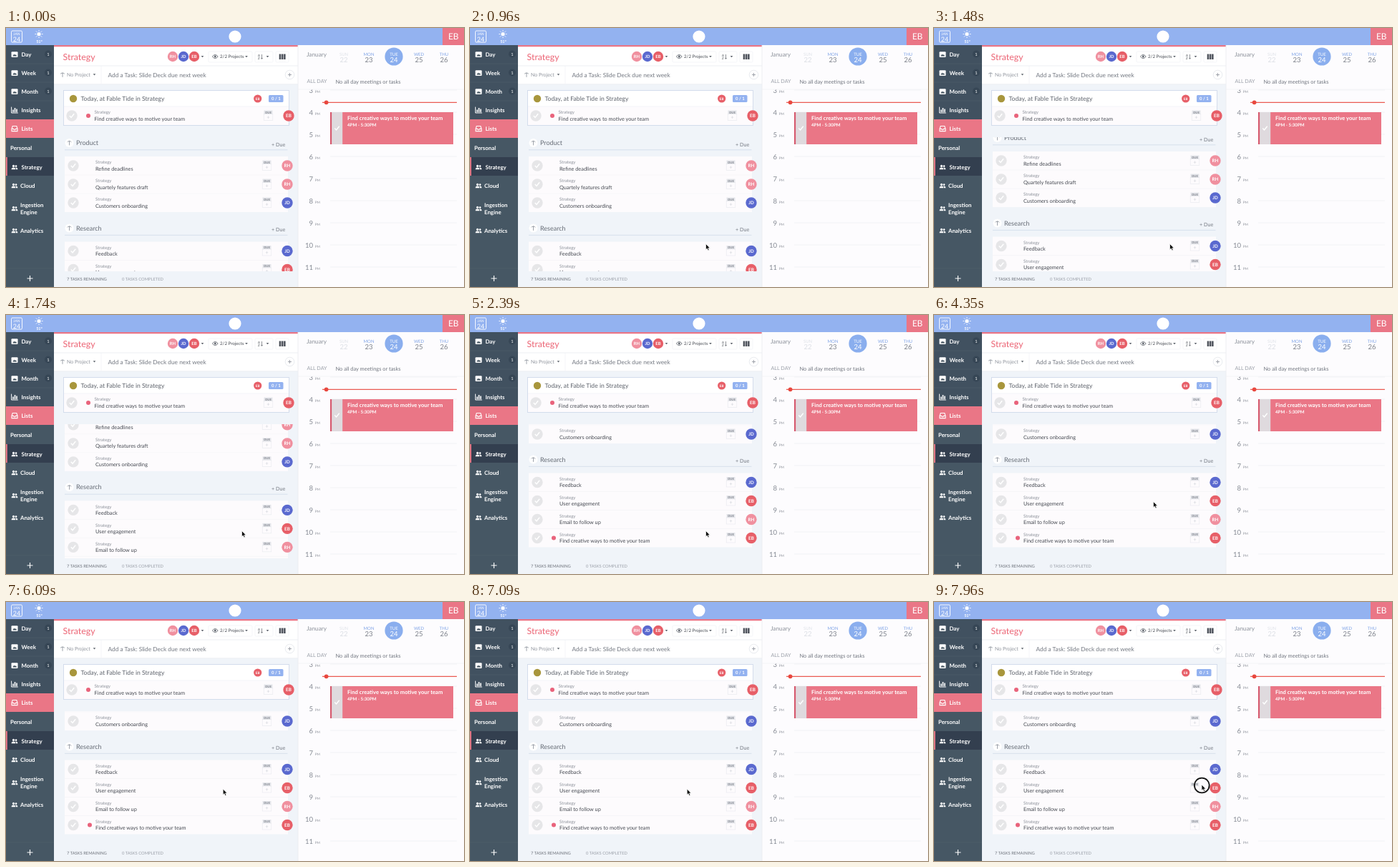
An HTML page that plays this animation: 640 px wide and 363 px high, repeating every 8000 ms.

```html
<!DOCTYPE html>
<html lang="en">
<head>
<meta charset="utf-8">
<title>Task planner</title>
<style>
  html, body { margin: 0; width: 100%; height: 100%; overflow: hidden; background: #fdfcfe; }
  svg { display: block; width: 100%; height: 100%; font-family: Lato, "Open Sans", sans-serif; text-rendering: geometricPrecision; }
</style>
</head>
<body>
<svg id="stage" viewBox="0 0 640 363"></svg>
<script>
const DURATION = 8000;
const PINK = '#ea7686', BLUE = '#93b2f0', INK = '#454951', GREY = '#8d929b', PALE = '#e6e8ed';
const PEOPLE = { RH: '#f0909f', JD: '#5a69cf', EB: '#e75f68' };

// Drawing helpers: each returns SVG markup.
const rect = (x, y, w, h, fill, extra = '') =>
  `<rect x="${x}" y="${y}" width="${w}" height="${h}" fill="${fill}" ${extra}/>`;
const circle = (x, y, r, fill, extra = '') =>
  `<circle cx="${x}" cy="${y}" r="${r}" fill="${fill}" ${extra}/>`;
const stroke = (d, color, width = 1, extra = '') =>
  `<path d="${d}" fill="none" stroke="${color}" stroke-width="${width}" ${extra}/>`;
const fill = (d, color) => `<path d="${d}" fill="${color}"/>`;
const text = (x, y, str, size, color = INK, extra = '') =>
  `<text x="${x}" y="${y}" font-size="${size}" fill="${color}" ${extra}>${str}</text>`;
const MID = 'text-anchor="middle"', BOLD = 'font-weight="700"';
const group = (x, y, body, scale = 1) => `<g transform="translate(${x} ${y}) scale(${scale})">${body}</g>`;

const caret = (x, y) => fill(`M${x - 1.8} ${y - 1}h3.6l-1.8 2.2z`, '#5d626b');
const plus = (x, y, r, color, width = 1) => stroke(`M${x - r} ${y}h${2 * r}M${x} ${y - r}v${2 * r}`, color, width);
const tick = (x, y, s, color, width) =>
  stroke(`M${x - s} ${y}l${s * .7} ${s * .75}l${s * 1.3} ${-s * 1.6}`, color, width);
const avatar = (x, y, who, r = 7.7) =>
  circle(x, y, r, PEOPLE[who]) + text(x, y + r * .3, who, r * .82, '#fff', MID + BOLD);
const signpost = (x, y) =>
  group(x, y, stroke('M0 -4V4.2M-3.6 -1.4Q-3 -3 0 -2.8Q3 -3 3.6 -1.4', '#9a9fa8', 1.2), .8);

function topBar() {
  const rays = Array.from({ length: 8 }, (_, i) =>
    stroke('M0 -3.8V-5.6', '#fff', .9, `transform="translate(46 8.5) rotate(${i * 45})"`)).join('');
  return rect(0, 0, 640, 24, BLUE) +
    rect(7.5, 4, 15, 16, 'none', 'rx="1.5" stroke="#fff" stroke-width=".9"') +
    text(15, 9.6, 'JAN', 5, '#fff', MID) + text(15, 18.5, '24', 9, '#fff', MID) +
    circle(46, 8.5, 2.6, '#fff') + rays + text(46.5, 20.5, '51°', 5.5, '#fff', MID + BOLD) +
    circle(320, 12, 8.6, '#fff') +
    rect(610, 0, 30, 24, PINK) + text(625.3, 16.3, 'EB', 12, '#fff', MID);
}

function sideIcon(kind, y) {
  const icons = {
    calendar: rect(-4.5, -3.8, 9, 7.8, '#fff', 'rx="1"') + fill('M-2.8 2.4L-.6 -.6L.8 1L1.8 0L3 2.4Z', '#43535f'),
    bars: stroke('M-4.4 -4.4V4H4.8', '#fff', 1) +
      [0, 1, 2].map(i => rect(-2.8 + i * 2.5, [-.5, -3, -1.5][i], 1.6, [3.4, 5.9, 4.4][i], '#fff')).join(''),
    tray: stroke('M-4 .4L-2.8 -3.5H2.8L4 .4V3.6H-4ZM-4 .4H-1.6Q0 3 1.6 .4H4', '#fff', 1.1),
    people: circle(-1.7, -1.8, 1.8, '#fff') + circle(2.3, -1.6, 1.5, '#fff') +
      fill('M-5 3.6Q-5 .7 -1.7 .7Q1.4 .7 1.4 3.6ZM2.2 3.6Q2.2 1.6 1.3 .8Q5 .2 5 3.6Z', '#fff')
  };
  return group(12, y, icons[kind], kind === 'people' ? .88 : 1);
}

function sidebar() {
  const items = [
    ['Day', 37, 'calendar', 1], ['Week', 63, 'calendar', 1], ['Month', 89, 'calendar', 1],
    ['Insights', 115, 'bars'], ['Lists', 141, 'tray'],
    ['Strategy', 195, 'people'], ['Cloud', 221, 'people'], ['Analytics', 284, 'people']
  ];
  const label = (x, y, str) => text(x, y + 2.6, str, 7.85, '#fff', BOLD);
  let out = rect(0, 24, 67, 339, '#465764') + rect(0, 24, 67, 104, '#415160') +
    rect(0, 128, 67, 26, PINK) + rect(0, 181, 67, 26, '#333f4f') + rect(0, 181, 1.8, 26, PINK) +
    stroke('M0 50H67M0 76H67M0 102H67M0 337H67', '#52636f', .5);
  for (const [name, y, icon, badge] of items) {
    out += sideIcon(icon, y) + label(name === 'Cloud' || name === 'Analytics' ? 20 : 21.5, y, name);
    if (badge) out += circle(59, y - .5, 5, '#364655') + text(59, y + 1.6, badge, 5.8, '#fff', MID);
  }
  return out + label(6, 168, 'Personal') + sideIcon('people', 253) +
    label(20, 248, 'Ingestion') + label(20, 258, 'Engine') + plus(33.5, 351, 4, '#fff', 1.1);
}

function header() {
  const box = (x, w) => rect(x, 33, w, 15, '#fff', 'rx="1.5" stroke="#f0f1f5" stroke-width=".7"');
  return rect(67, 24, 341, 55, '#fff') + rect(67, 24, 341, 2.2, PINK) +
    text(79.5, 44.6, 'Strategy', 12.4, '#ec6676') +
    avatar(233, 40, 'RH', 7.2) + avatar(248, 40, 'JD', 7.2) + avatar(263, 40, 'EB', 7.2) + caret(274.5, 40) +
    box(283, 61) + stroke('M288.4 40Q292.3 35 296.2 40Q292.3 45 288.4 40Z', '#5d626b', .9) +
    circle(292.3, 40, 1.4, '#5d626b') + text(299, 42.3, '2/2 Projects', 6.2, INK) + caret(336, 40) +
    box(348, 25) + text(352, 39.6, 'A', 4.4, INK) + text(352, 44.4, 'Z', 4.4, INK) +
    stroke('M357.5 37V43.3M356.3 42L357.5 43.4L358.7 42', '#5d626b', .7) + caret(365.5, 40) +
    box(377, 18) + [0, 1, 2].map(i => rect(381.7 + i * 3.2, 36.5, 2.5, 7.5, '#4d525b')).join('') +
    stroke('M67 53H408M67 78.8H408', '#e9ebf0', .8) + stroke('M133 53V78', '#f0f1f5', .7) +
    signpost(79, 65.5) + text(85, 68, 'No Project', 7, GREY) + caret(123.5, 65.3) +
    text(142.5, 68.6, 'Add a Task: Slide Deck due next week', 8.33, '#747982') +
    circle(396.5, 65.5, 6.3, '#fff', `stroke="${PALE}" stroke-width=".9"`) + plus(396.5, 65.5, 2.5, GREY, .8);
}

// A task row centred on y; the pinned card uses its own columns.
function task(y, title, who, { dot = false, pinned = false } = {}) {
  const dueX = pinned ? 366.5 : 364.5, textX = pinned ? 123.5 : 125, checkX = pinned ? 92 : 94;
  return circle(checkX, y, 7.7, '#e6e6e8') + tick(checkX, y, 3.2, '#fff', 1.5) +
    (dot ? circle(pinned ? 115 : 117, y, 3, '#e9637c') : '') +
    text(textX, y - 2.6, 'Strategy', 6.2, GREY) + text(textX, y + 6.6, title, 7.35, INK) +
    rect(dueX - 6.3, y - 2.5, 12.6, 9, 'none', `stroke="${PALE}" stroke-width=".6"`) +
    rect(dueX - 6, y - 7.5, 12, 5.2, '#e4e5ea') + text(dueX, y - 3.4, 'DUE', 4.2, '#7d828b', MID + BOLD) +
    plus(dueX, y + 2.2, 1.8, '#d3d6dc', .6) + avatar(pinned ? 395 : 393, y, who);
}

function todayCard() {
  return rect(80.5, 87.5, 315, 49, '#fff', 'stroke="#d0daea" stroke-width=".9"') +
    rect(81, 110, 314, 26, '#fdfbfd') + stroke('M81 110H395', '#eff1f6', .7) +
    circle(94, 99, 5.2, '#a8963c') + text(104.5, 102, 'Today, at Fable Tide in Strategy', 8.65, '#5d626b') +
    avatar(351.7, 99, 'EB', 5.6) + rect(367, 94, 20.5, 10, BLUE, 'rx="1.5"') +
    text(377.3, 101.2, '0 / 1', 6, '#fff', MID + BOLD) +
    task(123, 'Find creative ways to motive your team', 'EB', { dot: true, pinned: true });
}

function section(y, name, tasks) {
  const top = y + 19;
  return circle(88.5, y, 6, '#fff') + signpost(88.5, y) + text(98, y + 3, name, 9, '#646a74') +
    text(371, y + 4.9, '+ Due', 7.2, '#747982') + stroke(`M82 ${y + 9.8}H393.5`, '#d3deeb', .9) +
    rect(82, top, 312, tasks.length * 26, '#fdfbfd') +
    tasks.map(([title, who, dot], i) =>
      (i ? stroke(`M82 ${top + i * 26}H394`, '#f4f4f7', .7) : '') + task(top + 13 + i * 26, title, who, { dot })).join('');
}

function taskList() {
  const product = section(161, 'Product', [
    ['Refine deadlines', 'RH'], ['Quartely features draft', 'RH'], ['Customers onboarding', 'JD']]);
  const research = section(280.5, 'Research', [
    ['Feedback', 'JD'], ['User engagement', 'EB'], ['Email to follow up', 'RH'],
    ['Find creative ways to motive your team', 'EB', true]]);
  return `<clipPath id="listArea">${rect(67, 153, 341, 188, '#000')}</clipPath>
    <g clip-path="url(#listArea)"><g id="list">${product + research}</g></g>`;
}

function footer() {
  return rect(67, 341, 341, 22, '#f0f4f9') +
    text(85, 354, '7 TASKS REMAINING', 5.8, '#6d727b') + text(162, 354, '0 TASKS COMPLETED', 5.8, '#9a9fa8');
}

function calendar() {
  const days = ['SUN', 'MON', 'TUE', 'WED', 'THU'];
  let out = rect(408, 24, 232, 339, '#fdfcfe') + circle(542, 40, 12.6, '#8aaeee');
  days.forEach((day, i) => {
    const x = 472 + i * 35, today = i === 2;
    out += text(x, 39, day, 6, today ? '#fff' : i ? '#7fa3e6' : '#dfe2e8', MID) +
      text(x, 47.7, 22 + i, 9.6, today ? '#fff' : i ? '#7c818a' : '#dcdfe5', MID);
  });
  let hours = '';
  for (let h = 3; h <= 11; h++) {
    const y = 118 + (h - 4) * 31;
    hours += text(429.2, y + 3.5, h, 9.6, '#858a93', 'text-anchor="end"') + text(431.8, y + 3.5, 'PM', 4.7, GREY) +
      stroke(`M453 ${y}H630`, '#eeeef2', .8);
  }
  return out + text(420, 40, 'January', 8.3, GREY) +
    text(420.5, 77.3, 'ALL DAY', 7.2, '#9a9fa8') + text(460.5, 77.7, 'No all day meetings or tasks', 7.45, '#70757e') +
    `<clipPath id="hourArea">${rect(408, 86, 232, 277, '#000')}</clipPath>
     <g clip-path="url(#hourArea)">${hours}</g>` +
    stroke('M408 86H640', '#f0f0f4', .8) +
    stroke('M442 104.3H630', '#ea5a51', 1.2) + circle(447.6, 104.3, 2.9, '#e8483f') +
    rect(453, 118, 172, 45, PINK) + rect(453, 118, 2.2, 45, '#d65a6e') + rect(455.2, 118, 15, 45, '#dfdade') +
    tick(462.5, 140.5, 3.2, '#fff', 1.4) +
    text(477, 129, 'Find creative ways to motive your team', 7.65, '#fff', BOLD) +
    text(477, 138.3, '4PM - 5:30PM', 6.2, '#fff', BOLD) +
    stroke('M408 24V363', '#eaebf0', .8);
}

const cursor = `<g id="cursor">
  <circle id="ring" cx=".3" cy="1" r="10.4" fill="none" stroke="#111" stroke-width="1.8"/>
  <path d="M0 0V8.2L1.9 6.5L3.2 9.4L4.7 8.7L3.4 5.9H5.9Z" fill="#111" stroke="#fff" stroke-width=".7"/></g>`;

const stage = document.getElementById('stage');
stage.innerHTML = rect(67, 78, 341, 285, '#f0f4f9') + taskList() + header() + todayCard() +
  footer() + calendar() + sidebar() + topBar() + cursor;

const find = id => document.getElementById(id);
const list = find('list'), pointer = find('cursor'), ring = find('ring');

const smooth = (t, from, to) => {
  const p = Math.min(1, Math.max(0, (t - from) / (to - from)));
  return p * p * (3 - 2 * p);
};

// Pointer stops: [time, x, y]
const STOPS = [
  [350, 336, 366], [800, 329.5, 302.5], [3400, 329.5, 302.5], [4100, 306.5, 261.5],
  [4700, 306.5, 261.5], [5900, 303.2, 262], [7420, 303.2, 262], [7840, 374, 256]
];

function pointerAt(t) {
  let [, x, y] = STOPS[0];
  for (let i = 1; i < STOPS.length; i++) {
    const p = smooth(t, STOPS[i - 1][0], STOPS[i][0]);
    x += (STOPS[i][1] - STOPS[i - 1][1]) * p;
    y += (STOPS[i][2] - STOPS[i - 1][2]) * p;
  }
  return [x, y];
}

function render(t) {
  const [x, y] = pointerAt(t);
  list.setAttribute('transform', `translate(0 ${-78 * smooth(t, 1330, 2150)})`);
  pointer.setAttribute('transform', `translate(${x} ${y})`);
  ring.setAttribute('visibility', t >= 7880 ? 'visible' : 'hidden');
}

const start = performance.now();
function frame() {
  render((performance.now() - start) % DURATION);
  requestAnimationFrame(frame);
}
frame();
</script>
</body>
</html>
```
